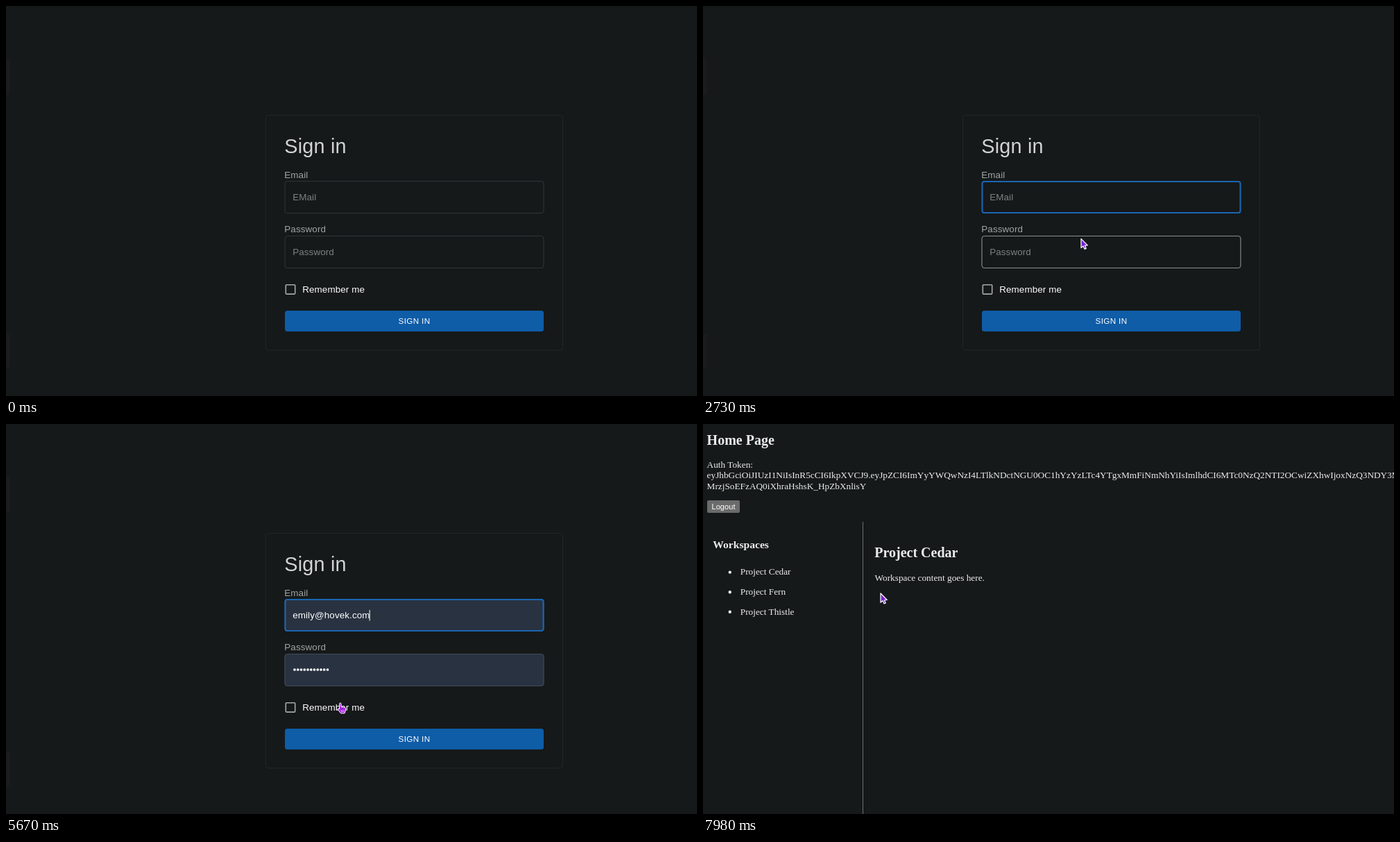
An HTML page for the animation above (8 s loop, 996 px wide and 562 px high).

```html
<!DOCTYPE html>
<html lang="en">
<head>
<meta charset="utf-8">
<title>Sign in</title>
<style>
  html, body { margin: 0; width: 100%; height: 100%; overflow: hidden; background: #15191a; }
  svg { display: block; width: 100vw; height: 100vh; }
  text { font: 13.4px "Liberation Sans", Arial, sans-serif; letter-spacing: .12px; fill: #fff; }
  .title { font-size: 28.8px; letter-spacing: .2px; fill: #d2d4d4; }
  .label { fill: #a2a5a5; }
  .hint { fill: #7e8181; }
  .action { font-size: 11.7px; letter-spacing: .33px; text-anchor: middle; }
  .field { fill: none; stroke: #303636; }
  .filled { fill: #293240; stroke: #434b57; }
  .focus { fill: none; stroke: #1a65b4; stroke-width: 2; }
  .hover { fill: none; stroke: #8c9090; }
  .caret { stroke: #fff; stroke-width: 1; }
  .ui text { font: 500 10.6px Inter, "Open Sans", sans-serif; letter-spacing: 0; }
  .ui .mid { text-anchor: middle; }
  .ui .small { font-size: 9px; fill: #eceeee; text-anchor: middle; }
  .ui .head { font-weight: 700; font-size: 10.6px; text-anchor: middle; }
  .home text { font: 13.3px "Liberation Serif", "Times New Roman", serif; letter-spacing: 0; fill: #ececec; }
  .home .h2 { font-weight: 700; font-size: 20px; }
  .home .h3 { font-weight: 700; font-size: 15.6px; }
  .home .btn { font: 11.1px "Liberation Sans", Arial, sans-serif; fill: #fff; text-anchor: middle; }
  #dialog { filter: drop-shadow(0 9px 12px rgba(0, 0, 0, .5)); }
  #row1, #row2 { fill: #333637; }
</style>
</head>
<body>
<svg viewBox="0 0 996 562" preserveAspectRatio="none">
  <defs>
    <linearGradient id="blue" x2="0" y2="1">
      <stop stop-color="#2380e6"/><stop offset="1" stop-color="#116bd0"/>
    </linearGradient>
    <clipPath id="buttonClip"><rect x="402" y="439" width="373" height="30" rx="3.5"/></clipPath>
  </defs>
  <rect width="996" height="562" fill="#15191a"/>

  <!-- sign-in page -->
  <g data-on="0-7140">
    <path d="M0 76h3q3 0 3 4v44q0 4-3 4H0zM0 472h3q3 0 3 4v42q0 4-3 4H0z" fill="#1a1c1d"/>
    <rect x="374.5" y="157.5" width="428" height="338.5" rx="4" fill="none" stroke="#202626"/>
    <text class="title" x="401.3" y="212">Sign in</text>
    <text class="label" x="401.3" y="247.6">Email</text>
    <text class="label" x="401.3" y="326.3">Password</text>

    <rect class="field" x="402" y="252.5" width="373" height="46" rx="3.5"/>
    <rect class="field" x="402" y="331.5" width="373" height="46" rx="3.5"/>
    <g data-on="0-2450 2660-4550">
      <text class="hint" x="413.2" y="280.3">EMail</text>
      <text class="hint" x="413.2" y="359.2">Password</text>
    </g>
    <g data-on="2450-2660 4550-7140">
      <rect class="filled" x="402" y="252.5" width="373" height="46" rx="3.5"/>
      <rect class="filled" x="402" y="331.5" width="373" height="46" rx="3.5"/>
      <text x="413.2" y="280.3">emily@hovek.com</text>
      <path d="M416 354h48" stroke="#fff" stroke-width="3.7" stroke-linecap="round" stroke-dasharray="0 4.75"/>
    </g>
    <rect class="focus" data-on="1120-2800 4550-5950" x="402.5" y="253" width="372" height="45" rx="3"/>
    <rect class="hover" data-on="2660-5460" x="402" y="331.5" width="373" height="46" rx="3.5"/>
    <path class="caret" data-on="1120-1610 2100-2450" d="M413.8 268v15.5"/>
    <path class="caret" data-on="4550-5040 5600-5950" d="M524.2 268v15.5"/>

    <rect data-on="0-5950" x="403.3" y="401.7" width="13.4" height="13.4" rx="1" fill="none" stroke="#a6a9a9" stroke-width="1.6"/>
    <g data-on="5950-7140">
      <rect x="402.5" y="400.8" width="15.2" height="15.2" rx="2" fill="#4a9eee"/>
      <path d="M405.2 408.6l3.4 3.4 6.6-6.8" fill="none" stroke="#15191a" stroke-width="1.8"/>
    </g>
    <text x="427.2" y="413">Remember me</text>

    <g clip-path="url(#buttonClip)">
      <rect x="402" y="439" width="373" height="30" fill="#0f5ca7"/>
      <rect data-on="6300-7140" x="402" y="439" width="373" height="30" fill="#0f5298"/>
      <circle id="ripple" data-on="6790-7140" cx="495" cy="454" fill="#fff" fill-opacity=".2"/>
    </g>
    <text class="action" x="588.5" y="458.2">SIGN IN</text>
  </g>

  <!-- password suggestions -->
  <g class="ui" data-on="1610-2660" data-fade="210">
    <path d="M490 306h6l5-4 5 4h152q6 0 6 6v74q0 6-6 6H490q-6 0-6-6v-74q0-6 6-6z" fill="#191c1d"/>
    <rect id="row1" data-on="2380-2660" x="487" y="309" width="174" height="44" rx="4"/>
    <rect id="row2" data-on="2100-2380" x="487" y="360" width="174" height="30" rx="4"/>
    <path d="M484 356h180" stroke="#6d7071"/>
    <circle cx="500.5" cy="330.5" r="6.5" fill="#dcb43c"/>
    <text x="517" y="325.6">emily@hovek.com</text>
    <path d="M519.3 341h54" stroke="#d5d7d7" stroke-width="2.4" stroke-linecap="round" stroke-dasharray="0 5.3"/>
    <circle cx="502" cy="375" r="6" fill="#c3c5c6"/>
    <text x="520" y="378.8" fill-opacity=".82">Manage Passwords...</text>
    <circle cx="642.5" cy="375" r="4" fill="#4285e8"/>
  </g>

  <!-- system prompt -->
  <g id="dialog" class="ui" data-on="2870-4480" data-fade="210">
    <rect x="478" y="19.5" width="214" height="244.5" rx="9" fill="#1f2326" stroke="#55595b"/>
    <circle cx="585" cy="63" r="23.5" fill="#f3eef0"/>
    <circle cx="598.5" cy="76" r="10" fill="#db4437"/>
    <text class="head" x="585" y="116.5">Ovelda Bramon</text>
    <text class="small" x="585" y="136">Ovelda Bramon is trying to fill your</text>
    <text class="small" x="585" y="147.6">password on localhost:3000.</text>
    <text class="small" x="585" y="172.4">Fleck ID or enter your password to</text>
    <text class="small" x="585" y="184">allow this.</text>
    <rect x="490.5" y="199.5" width="189" height="23.5" rx="4.5" fill="url(#blue)"/>
    <text class="mid" x="587" y="214.8">Use Password...</text>
    <rect x="490.5" y="228" width="189" height="23" rx="4.5" fill="#5b5e60"/>
    <text class="mid" x="585" y="243.2">Cancel</text>
  </g>

  <!-- home page -->
  <g class="home" data-on="7140-8000">
    <text class="h2" x="5.6" y="29.5">Home Page</text>
    <text x="5.6" y="63">Auth Token:</text>
    <text x="5.6" y="78.4">eyJhbGciOiJIUzI1NiIsInR5cCI6IkpXVCJ9.eyJpZCI6ImYyYWQwNzI4LTlkNDctNGU0OC1hYzYzLTc4YTgxMmFiNmNhYiIsImlhdCI6MTc0NzQ2NTI2OCwiZXhwIjoxNzQ3NDY3MjY4fQ</text>
    <text x="5.6" y="93.8">MrzjSoEFzAQ0iXhraHshsK_HpZbXnlisY</text>
    <rect x="6" y="110" width="47" height="18" rx="2" fill="#6b6b6b"/>
    <text class="btn" x="29.5" y="123">Logout</text>
    <path d="M230.5 141V562" stroke="#6c7070"/>
    <text class="h3" x="14.3" y="179">Workspaces</text>
    <path d="M38.8 213.6v60" stroke="#ececec" stroke-width="4.4" stroke-linecap="round" stroke-dasharray="0 28.6"/>
    <text x="53.8" y="217.4">Project Cedar</text>
    <text x="53.8" y="246">Project Fern</text>
    <text x="53.8" y="274.6">Project Thistle</text>
    <text class="h2" x="247.3" y="192">Project Cedar</text>
    <text x="247.5" y="225.5">Workspace content goes here.</text>
  </g>

  <g id="pointer" data-on="280-8000">
    <path data-on="280-1120 2030-4480 5460-5530 7140-8000" d="M0 0V13.2L3 10.6 5 15l2.3-1-1.9-4.2 3.9-.3z"
      fill="#7722d6" stroke="#fff" stroke-width="1.2" stroke-linejoin="round"/>
    <g data-on="1120-2030 4480-5460" fill="none">
      <path id="beam" d="M-3-6.5Q0-6.5 0-4.5 0-6.5 3-6.5M0-4.5v9M-3 6.5Q0 6.5 0 4.5 0 6.5 3 6.5M-1.6 1h3.2" stroke="#ecdcfa" stroke-width="3"/>
      <use href="#beam"/>
      <path d="M-3-6.5Q0-6.5 0-4.5 0-6.5 3-6.5M0-4.5v9M-3 6.5Q0 6.5 0 4.5 0 6.5 3 6.5M-1.6 1h3.2" stroke="#9333dc" stroke-width="1.4"/>
    </g>
    <g data-on="5530-7140" stroke="#fff" stroke-linejoin="round">
      <path d="M2.6 1.2c0-1.7 2.5-1.7 2.5 0v4.2l4.8 1c1.3.3 1.9 1 1.7 2.3l-.6 3.8-1 2.4H4.6L.4 9.8c-.8-1.3.6-2.4 1.7-1.3l.5.5z" fill="#a824e0"/>
      <path d="M5.4 10.5v2.4M7.2 10.5v2.4M9 10.5v2.4" stroke-width=".7"/>
    </g>
  </g>
</svg>
<script>
const LOOP = 8000, STEP = 70;
// pointer path: time, x, y
const path = [
  [280, 499, 537], [770, 522, 254], [980, 527, 270], [1960, 527, 270],
  [2170, 545, 361], [2240, 546, 366], [2310, 546, 366], [2520, 545, 330],
  [2660, 545, 332], [2870, 545, 345], [4410, 545, 345], [4480, 545, 344],
  [5180, 545, 344], [5670, 478, 402], [5810, 486, 416], [5950, 482, 405],
  [6020, 482, 405], [6510, 492, 459], [6790, 490, 448], [7490, 490, 448],
  [7980, 256, 244]
];
const parts = [...document.querySelectorAll("[data-on]")].map(el => ({
  el,
  spans: el.dataset.on.split(" ").map(s => s.split("-").map(Number)),
  fade: Number(el.dataset.fade) || 0
}));
const pointer = document.getElementById("pointer");
const ripple = document.getElementById("ripple");

function pointerAt(t) {
  const i = path.findIndex(p => p[0] > t);
  if (i === 0) return path[0].slice(1);
  if (i < 0) return path[path.length - 1].slice(1);
  const [t0, x0, y0] = path[i - 1], [t1, x1, y1] = path[i];
  const p = (t - t0) / (t1 - t0), k = p * p * (3 - 2 * p);
  return [x0 + (x1 - x0) * k, y0 + (y1 - y0) * k];
}

function draw(t) {
  for (const { el, spans, fade } of parts) {
    const span = spans.find(([a, b]) => t >= a && t < b);
    el.style.display = span ? "" : "none";
    if (fade && span) el.style.opacity = Math.min(1, (t - span[0] + STEP) / fade);
  }
  pointer.setAttribute("transform", `translate(${pointerAt(t)})`);
  const p = Math.min(1, Math.max(0, (t - 6790) / 550));
  ripple.setAttribute("r", 281 * (1 - (1 - p) ** 2.45));
}

const start = performance.now();
function tick() {
  const t = (performance.now() - start) % LOOP;
  draw(Math.floor(t / STEP) * STEP);
  requestAnimationFrame(tick);
}
tick();
</script>
</body>
</html>
```
